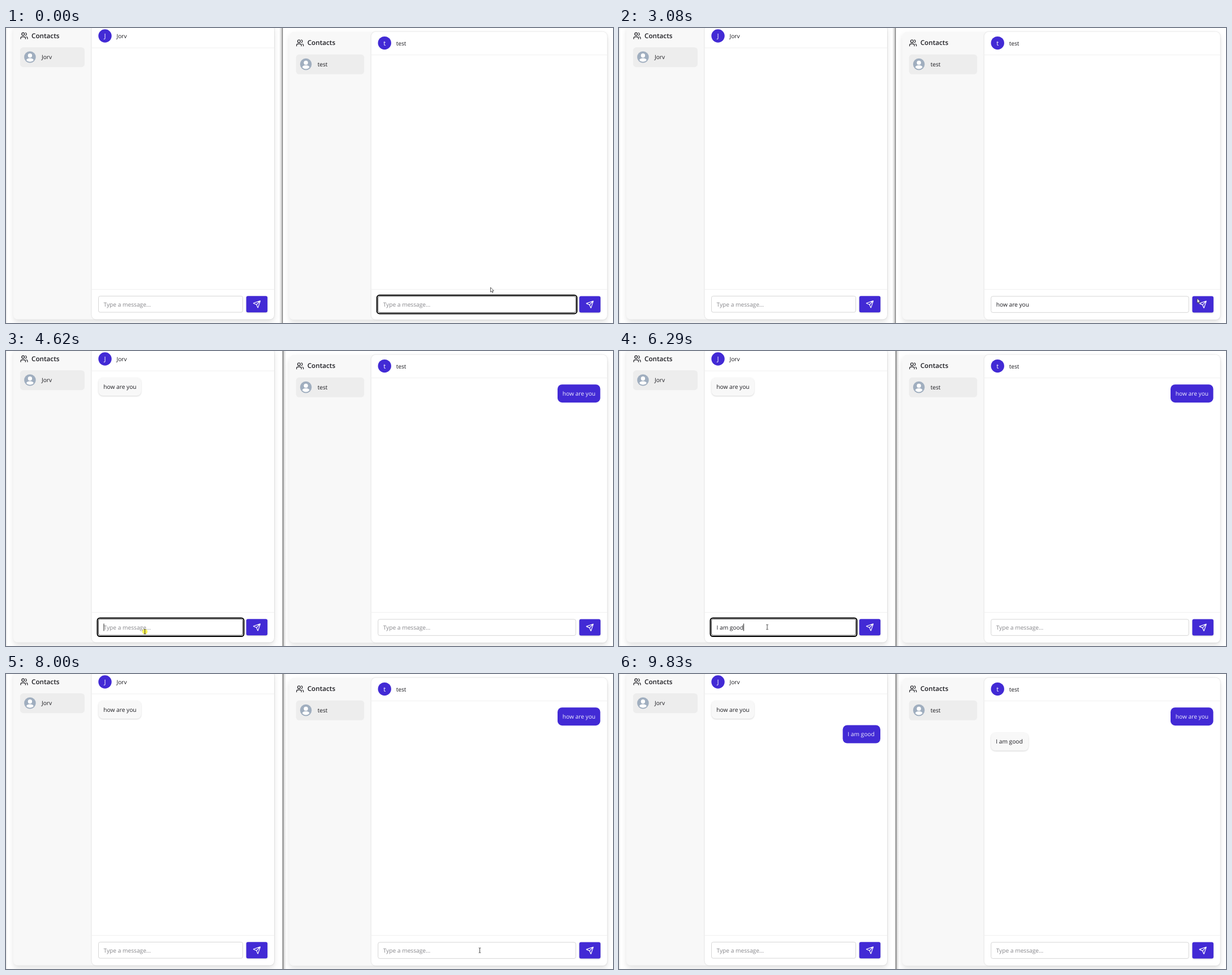
Write an HTML page that moves like this. It is 1073 px wide and 522 px high and loops after 9.9 s.

```html
<!DOCTYPE html>
<html lang="en">
<head>
<meta charset="utf-8">
<title>Two chat windows</title>
<style>
html, body { margin: 0; width: 100%; height: 100%; overflow: hidden; background: #fff; }
svg { display: block; width: 1073px; height: 522px; }
text { font: 400 10.2px "Open Sans", "Noto Sans", sans-serif; fill: #1b1b20; white-space: pre; text-rendering: geometricPrecision; }
.title { font-weight: 600; font-size: 11.7px; }
.initial { font-size: 11.4px; fill: #fff; text-anchor: middle; }
.hint { fill: #87878b; }
.light { fill: #f1efff; }
.icon { fill: none; stroke-width: 2; stroke-linecap: round; stroke-linejoin: round; }
.card { filter: drop-shadow(0 5px 5px rgba(0,0,0,.11)); }
.chat { filter: drop-shadow(0 0 1px rgba(0,0,0,.16)); }
.soft { filter: drop-shadow(0 1px 1px rgba(0,0,0,.16)); }
</style>
</head>
<body>
<svg id="stage" viewBox="0 0 1073 522" xmlns="http://www.w3.org/2000/svg">
  <defs>
    <linearGradient id="fadeL"><stop stop-color="#000" stop-opacity="0"/><stop offset="1" stop-color="#000" stop-opacity=".22"/></linearGradient>
    <linearGradient id="fadeR"><stop stop-color="#000" stop-opacity=".22"/><stop offset="1" stop-color="#000" stop-opacity="0"/></linearGradient>
  </defs>
  <rect width="2" height="522" fill="#f1f1f1"/>
  <g id="panes"></g>
  <g id="edgeRight"><rect x="483" width="5" height="522" fill="url(#fadeL)"/><rect x="488" width="1.3" height="522" fill="#777"/></g>
  <g id="edgeLeft"><rect x="490" width="5" height="522" fill="url(#fadeR)"/><rect x="488.7" width="1.6" height="522" fill="#777"/></g>
  <circle id="click" r="4.6" fill="#f4ec32" opacity=".85"/>
  <g id="cursor">
    <path id="arrow" d="M0 0V8.2L1.9 6.5 3.2 9.3 4.5 8.7 3.3 6H5.8Z" fill="#fff" stroke="#333" stroke-width=".8"/>
    <path id="beam" d="M-1.8-4.2H-.5L0-3.8.5-4.2H1.8M0-3.8V3.8M-1.8 4.2H-.5L0 3.8.5 4.2H1.8" fill="none" stroke="#333" stroke-width=".9"/>
    <path id="hand" d="M-1 .7Q0-.6 1 .7V4L4.4 4.8Q5.5 5.2 5.2 6.8L4.5 9.8V11.3H-.3V10L-3.2 6.7Q-3.1 5.3-1.8 5.9L-1 6.6Z" fill="#fff" stroke="#222" stroke-width=".6"/>
  </g>
</svg>
<script>
const LOOP = 9900, INK = '#422ad5', HOVER = '#3822bd';
const $ = id => document.getElementById(id);

const rect = (x, y, w, h, r, fill, extra = '') =>
  `<rect x="${x}" y="${y}" width="${w}" height="${h}" rx="${r}" fill="${fill}" ${extra}/>`;
const label = (x, y, s, cls = '', extra = '') => `<text x="${x}" y="${y}" class="${cls}" ${extra}>${s}</text>`;
const icon = (x, y, color, body) =>
  `<g class="icon" transform="translate(${x} ${y}) scale(.6)" stroke="${color}">${body}</g>`;

const USERS = '<path d="M16 21v-2a4 4 0 0 0-4-4H6a4 4 0 0 0-4 4v2M22 21v-2a4 4 0 0 0-3-3.87M16 3.13a4 4 0 0 1 0 7.75"/><circle cx="9" cy="7" r="4"/>';
const SEND = '<path d="M14.54 21.69a.5.5 0 0 0 .93-.03l6.5-19a.5.5 0 0 0-.63-.63l-19 6.5a.5.5 0 0 0-.03.93l7.93 3.18a2 2 0 0 1 1.11 1.11zM21.85 2.15 10.91 13.09"/>';

const bubble = (x, y, w, s, own) => '<g class="bubble">' +
  rect(x, y, w, 32, 8, own ? INK : '#f8f8f8', own ? '' : 'class="soft"') +
  label(x + 8.8, y + 19.5, s, own ? 'light' : '') + '</g>';

const avatar = (x, y) => `<g transform="translate(${x} ${y})"><circle r="10.3" fill="#a0aebf"/>
  <circle cy="-2.7" r="3.7" fill="#fff"/><path d="M-6.4 5.4Q-5.8 1.9 0 1.9T6.4 5.4Q4 8.3 0 8.3T-6.4 5.4Z" fill="#fff"/></g>`;

// All positions of one window derive from its card edges.
function pane(p) {
  const { id, name, x, y, mid, right, bottom } = p;
  const in0 = p.in0 = mid + 12, inW = p.inW = right - mid - 67.5, top = p.top = bottom - 41.2;
  const btn = p.btn = right - 49.3;
  const cardH = bottom - y;
  return `<g id="${id}">
    <g class="card">${rect(x, y, right - x, cardH, 8, '#f8f8f8')}</g>
    <g class="chat">${rect(mid, y, right - mid, cardH, 8, '#fff')}</g>
    ${rect(mid, y + 40.4, right - mid, 1, 0, '#f0f0f0')}${rect(mid, 462, right - mid, 1, 0, '#f0f0f0')}
    ${icon(x + 11.8, y + 12.4, '#1b1b20', USERS)}${label(x + 32, y + 23.6, 'Contacts', 'title')}
    ${rect(x + 12, y + 40, mid - x - 24.5, 35, 5.5, '#ededed')}
    ${avatar(x + 29.4, y + 57.3)}${label(x + 50, y + 61, name)}
    <circle cx="${mid + 23.5}" cy="${y + 19.8}" r="11.7" fill="${INK}"/>
    ${label(mid + 23.5, y + 23.8, name[0], 'initial')}${label(mid + 44, y + 23.8, name)}
    ${rect(in0, top, inW, 28.6, 3, '#fff', 'class="box" stroke="#d6d6d6"')}
    ${rect(in0 - 2, top - 2, inW + 4, 32.6, 4.5, 'none', 'class="ring" stroke="#000" stroke-width="2"')}
    ${label(in0 + 9, top + 18.4, 'Type a message...', 'hint')}${label(in0 + 9, top + 18.4, '', 'typed')}
    ${rect(0, top + 8, 1, 13, 0, '#222', 'class="caret"')}
    ${rect(btn, top - .2, 37.5, 29, 3, INK, 'class="btn soft"')}${icon(btn + 11.5, top + 7.2, '#fff', SEND)}
    ${p.bubbles.map(b => bubble(...b)).join('')}</g>`;
}

const panes = [
  { id: 'left', name: 'Jorv', x: 13, y: -5.8, mid: 151.5, right: 474, bottom: 515.6,
    focus: [4550, 7330], clear: 7930, text: 'I am good',
    keys: [5340, 5480, 5570, 5660, 5750, 5890, 6020, 6160, 6290],
    bubbles: [[163.5, 47, 75.5, 'how are you', 0], [395.5, 90.5, 66.5, 'I am good', 1]] },
  { id: 'right', name: 'test', x: 500.7, y: 6.8, mid: 645.7, right: 1062.7, bottom: 516,
    focus: [0, 2960], clear: 3450, text: 'how are you',
    keys: [130, 230, 330, 440, 550, 660, 910, 980, 1250, 1320, 1590],
    bubbles: [[975, 59.2, 75.5, 'how are you', 1], [657.5, 103.5, 66.3, 'I am good', 0]] }
];
const SHOWN = [3650, 8200];

// Pointer way points: time, x, y
const path = [
  [2380, 856.5, 459], [2900, 1014, 476], [3080, 1022, 478.5], [3360, 1026, 481],
  [3800, 700, 462], [4410, 246, 494], [4480, 245.5, 496.5], [4690, 245.5, 496.5], [4820, 262, 488.5],
  [6820, 262, 488.5], [7240, 440, 490], [7640, 446, 488], [7790, 498, 484], [8000, 837.5, 489],
  [8500, 897, 477], [8880, 922, 403], [9360, 1052, 524]
];

$('panes').innerHTML = panes.map(pane).join('');
for (const p of panes) {
  const root = $(p.id);
  for (const c of ['box', 'ring', 'hint', 'typed', 'caret', 'btn']) p[c] = root.querySelector('.' + c);
  p.items = root.querySelectorAll('.bubble');
}

const show = (el, on) => el.setAttribute('visibility', on ? 'visible' : 'hidden');

function pointerAt(t) {
  const i = path.findIndex(k => k[0] > t);
  if (i < 1) return (i ? path[path.length - 1] : path[0]).slice(1);
  const [t0, x0, y0] = path[i - 1], [t1, x1, y1] = path[i];
  const u = (t - t0) / (t1 - t0), e = u * u * (3 - 2 * u);
  return [x0 + (x1 - x0) * e, y0 + (y1 - y0) * e];
}

function draw(t) {
  const [x, y] = pointerAt(t);
  let kind = 'arrow';
  for (const p of panes) {
    const inRow = y > p.top && y < p.top + 29;
    const over = inRow && x > p.btn && x < p.btn + 37.5;
    if (over) kind = 'hand';
    else if (inRow && x > p.in0 && x < p.in0 + p.inW) kind = 'beam';
    p.btn_ = over;
    const focused = t >= p.focus[0] && t < p.focus[1];
    const count = t < p.clear ? p.keys.filter(k => k <= t).length : 0;
    p.typed.textContent = p.text.slice(0, count);
    show(p.hint, !count);
    show(p.ring, focused);
    p.box.setAttribute('stroke', focused ? '#555' : '#d6d6d6');
    // The blink restarts at every key press.
    const since = t - (count ? p.keys[count - 1] : p.focus[0] || -530) - (p.focus[0] && !count ? 60 : 0);
    show(p.caret, focused && since >= 0 && since % 1060 < 530);
    p.caret.setAttribute('x', p.in0 + 9 + (count ? p.typed.getComputedTextLength() : 0));
    p.items.forEach((b, i) => show(b, t >= SHOWN[i]));
  }
  panes.forEach(p => p.root_fill !== p.btn_ && paintButton(p));
  for (const id of ['arrow', 'beam', 'hand']) show($(id), id === kind);
  $('cursor').setAttribute('transform', `translate(${x} ${y})`);
  $('click').setAttribute('transform', `translate(${x} ${y})`);
  show($('click'), t >= 4550 && t < 4690);
  show($('edgeRight'), t < 4550);
  show($('edgeLeft'), t >= 4550);
}

function paintButton(p) {
  p.root_fill = p.btn_;
  $(p.id).querySelector('.btn').setAttribute('fill', p.btn_ ? HOVER : INK);
}

const start = performance.now();
function tick() {
  draw((performance.now() - start) % LOOP);
  requestAnimationFrame(tick);
}
tick();
</script>
</body>
</html>
```
